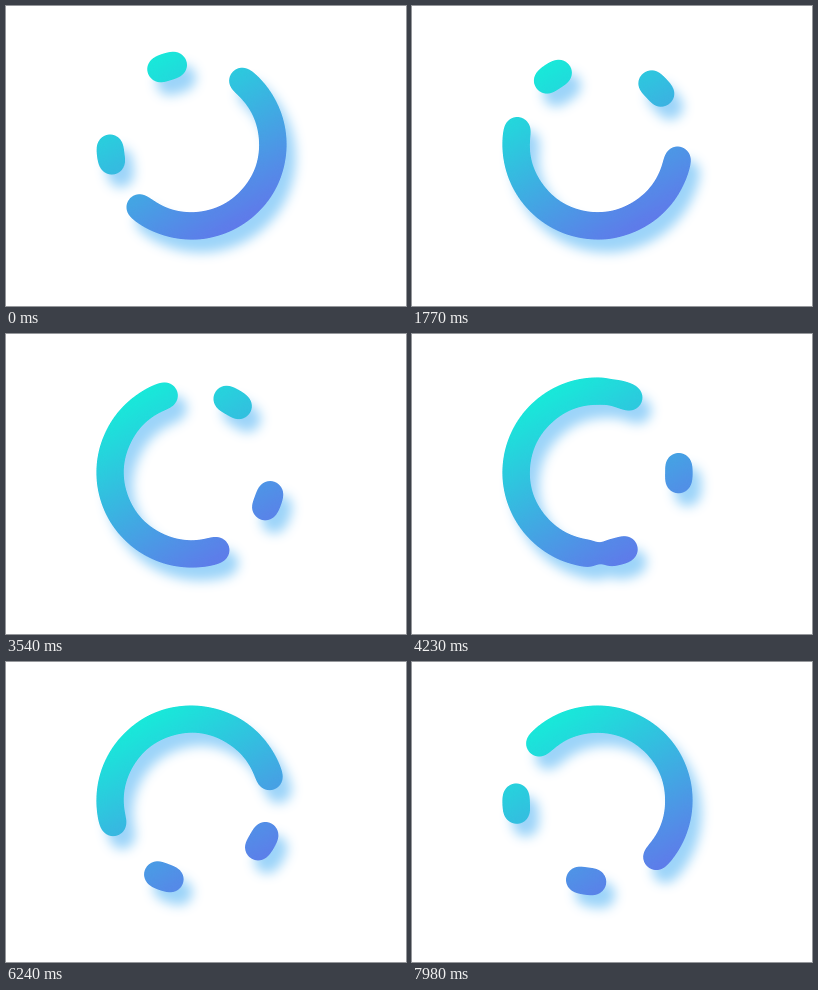
Write an HTML page that moves like this. It is 400 px wide and 300 px high and loops after 8000 ms.

```html
<!DOCTYPE html>
<html lang="en">
<head>
<meta charset="utf-8">
<title>Gooey ring loader</title>
<style>
  html, body { margin: 0; width: 100%; height: 100%; overflow: hidden; background: #fff; }
  svg { display: block; width: 100vw; height: 100vh; }
</style>
</head>
<body>
<svg viewBox="0 0 400 300">
  <defs>
    <linearGradient id="tint" gradientUnits="userSpaceOnUse" x1="138" y1="56.2" x2="233" y2="220.8">
      <stop offset="0" stop-color="#17ead9"/>
      <stop offset="1" stop-color="#6078ea"/>
    </linearGradient>
    <filter id="goo" filterUnits="userSpaceOnUse" x="0" y="0" width="400" height="300"
            color-interpolation-filters="sRGB">
      <feGaussianBlur stdDeviation="4"/>
      <feColorMatrix values="1 0 0 0 0  0 1 0 0 0  0 0 1 0 0  0 0 0 12 -5" result="blob"/>
      <feGaussianBlur in="blob" stdDeviation="6"/>
      <feOffset dx="9" dy="13"/>
      <feColorMatrix values="0 0 0 0 .61  0 0 0 0 .83  0 0 0 0 .975  0 0 0 1 0" result="shadow"/>
      <feMerge>
        <feMergeNode in="shadow"/>
        <feMergeNode in="blob"/>
      </feMerge>
    </filter>
  </defs>
  <g filter="url(#goo)">
    <path id="ring" fill="none" stroke="url(#tint)" stroke-width="26.6" stroke-linecap="round"/>
  </g>
</svg>
<script>
  const LOOP = 8000, STEP = 30;
  const CX = 185.5, CY = 138.5, R = 81.5;
  const SMILE = 178.6, DOT = 10;
  const ring = document.getElementById('ring');

  const point = deg => {
    const a = deg * Math.PI / 180;
    return (CX + R * Math.cos(a)).toFixed(2) + ' ' + (CY + R * Math.sin(a)).toFixed(2);
  };

  // Arc of the given length, centred on an angle, split in two to stay below 180 degrees
  const arc = (mid, length) => {
    const to = deg => `A${R} ${R} 0 0 1 ${point(deg)}`;
    return `M${point(mid - length / 2)}${to(mid)}${to(mid + length / 2)}`;
  };

  function draw(ms) {
    const t = Math.floor(ms / STEP) * STEP / 1000;
    const mid = 40.3 + 34.25 * t;

    // Dots run backwards through the gap, slowing down where they meet the smile
    const phase = (((0.8 - 4.472 * t) % 2) + 2) % 2 - 1;
    let d = arc(mid, SMILE);
    for (const slot of [-3, -1, 1, 3]) {
      d += arc(mid + 180 + 105 * Math.sin(0.39 * (phase + slot)), DOT);
    }
    ring.setAttribute('d', d);
  }

  function tick() {
    draw(performance.now() % LOOP);
    requestAnimationFrame(tick);
  }
  tick();
</script>
</body>
</html>
```
